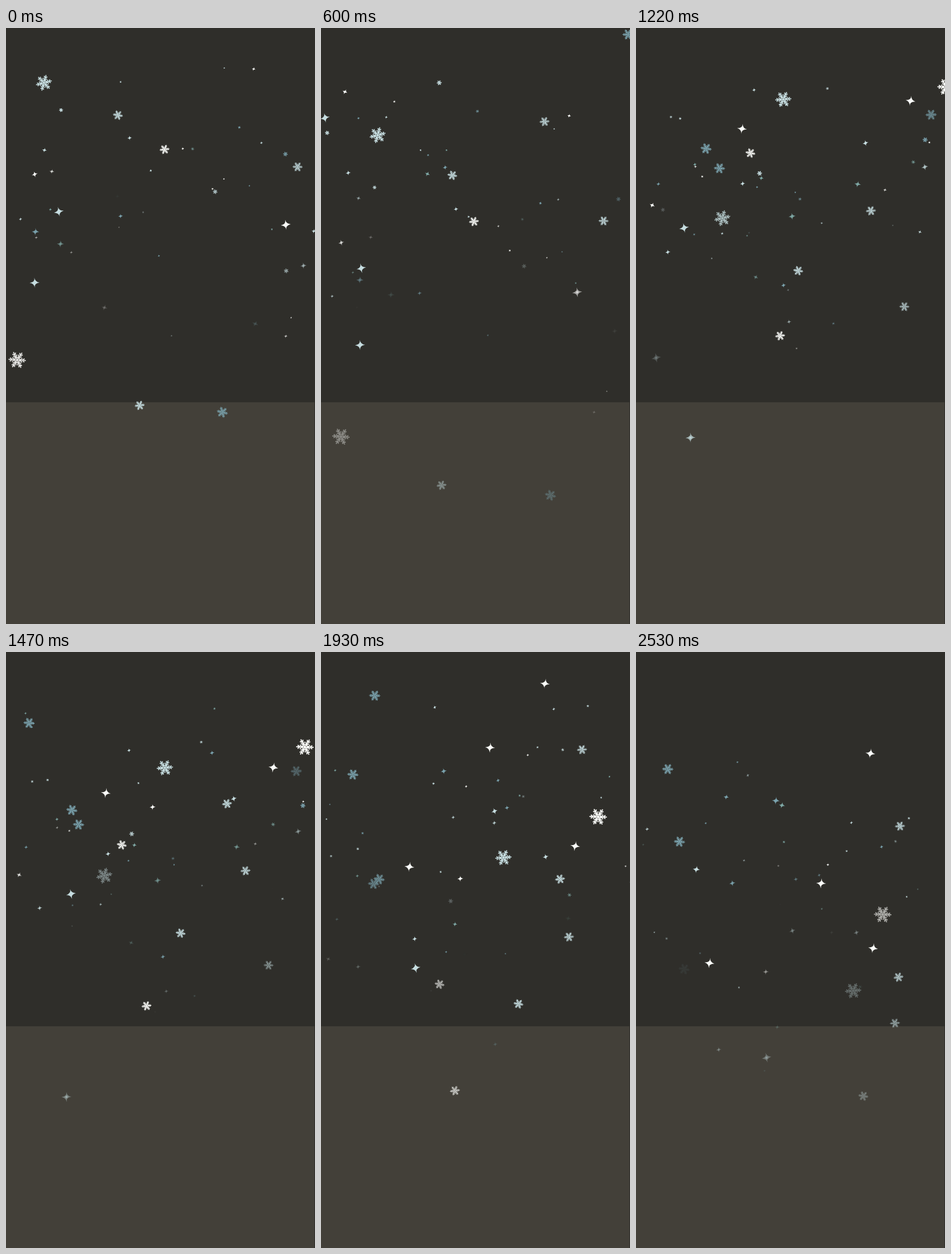
Animation of 497 by 957 pixels, one loop 2750 ms. Source, as an HTML page with a canvas:

```html
<!DOCTYPE html>
<html lang="en">
<head>
<meta charset="utf-8">
<title>Snowfall</title>
<style>
  html, body { margin: 0; width: 100%; height: 100%; overflow: hidden; background: #2f2e2a; }
  canvas { display: block; width: 497px; height: 957px; }
</style>
</head>
<body>
<canvas id="stage" width="497" height="957"></canvas>
<script>
const W = 497, H = 957, FLOOR = 601;
const LOOP = 2750, START = 210, HOLD = 230, LAST = 2530;
const ctx = document.getElementById('stage').getContext('2d');
const WHITE = '#fbfcf9', PALE = '#c6dde0', BLUE = '#7ba3ae', TEAL = '#7fa8a5';

// Rows: x, y, vx, vy, end, birth, acceleration (px, px/s, s)
const leads = [
  { draw: flake, tone: PALE, r: 13, rows: [
    [61, 88, 77, 215, 1.65], [175, -122, 50.5, 193, 2.6, 0, .21]] },
  { draw: flake, tone: WHITE, r: 14, rows: [
    [18, 533, 36, 315, .7], [565, -117, -60, 192, 2.8, 0, .09]] },
  { draw: flake, tone: PALE, r: 8, rows: [
    [180, 140, 80, 247, 2.65], [469, 223, -37, 222, 1.65], [348, 60, 29.5, 231, 2.8, .2],
    [276, -88, 63, 263, 3, 1.2], [215, 606, -54, 328, .8], [406, -196, 8, 205, 9, 1.7]] },
  { draw: flake, tone: WHITE, r: 8, rows: [
    [255, 195, -23, 296, 2.3], [177, -149, 5.5, 274, 2.25, 0, .26]] },
  { draw: flake, tone: BLUE, r: 9, rows: [
    [348, 617, 54, 341, .75], [506, -71, -31, 208, 1.65], [140, -50, -27, 241, 2.4, .85],
    [205, 16, -70, 207, 2.3, .5], [-2, -113, 31, 180, 9, 1.2], [188, -269, -59, 197, 9, 1.6]] },
  { draw: star, tone: WHITE, r: 8, rows: [
    [450, 316, -97, 277, .85], [211, -99, -40, 258, 9, .6], [198, -473, 43, 364],
    [312, -271, 28, 187], [488, -160, -46, 274, 9, .85]] },
  { draw: star, tone: PALE, r: 8, rows: [
    [-41, 26, 124, 309, 2.6, 0, -.055], [85, 295, -52, 232, 1.2], [46, 409, 44, 262, 1.6, 0, -.06]] }
];

let seed = 71;
function rnd(lo = 0, hi = 1) {
  seed = (seed * 16807) % 2147483647;
  return lo + (hi - lo) * seed / 2147483647;
}

const parts = [];
for (const { draw, tone, r, rows } of leads)
  for (const [x, y, vx, vy, end = 9, birth = 0, acc = 0] of rows)
    parts.push({ draw, tone, r, x, y, vx, vy, end, birth, acc, rot: rnd(-.25, .25) });

// Fine snow released steadily near the top
const COUNT = 112;
for (let i = 0; i < COUNT; i++) {
  const birth = -1.4 + 3.4 * i / COUNT;
  const vx = rnd(-75, 75), vy = rnd(180, 330);
  const draw = rnd() < .68 ? star : flake;
  const r = 1.6 + 5 * rnd() ** 2;
  parts.push({
    draw, vx, vy, birth, acc: 0,
    r: draw === flake ? r * .8 : r,
    tone: [WHITE, PALE, PALE, BLUE, TEAL][Math.floor(rnd(0, 5))],
    x: rnd(-10, W + 10) - vx * birth,
    y: rnd(45, 215) - vy * birth,
    end: birth + rnd(1, 1.75),
    rot: rnd(-.5, .5)
  });
}

function star(r) {
  const k = r * .13;
  ctx.beginPath();
  ctx.moveTo(0, -r);
  for (const [x, y] of [[1, 0], [0, 1], [-1, 0], [0, -1]]) {
    const px = y ? -y : x, py = x ? x : y;
    ctx.quadraticCurveTo((x || px) * k, (y || -py) * k, x * r, y * r);
  }
  ctx.closePath();
  ctx.fill();
  ctx.beginPath();
  ctx.arc(0, 0, r * .24, 0, 7);
  ctx.fill();
}

function flake(r) {
  ctx.lineWidth = Math.max(.8, r * .12);
  ctx.beginPath();
  for (let i = 0; i < 6; i++) {
    const a = i * Math.PI / 3;
    const at = (d, turn) => [d * r * Math.cos(a + turn), d * r * Math.sin(a + turn)];
    ctx.moveTo(0, 0);
    ctx.lineTo(...at(1, 0));
    if (r < 3) continue;
    for (const [root, tip, turn] of [[.58, .86, .24], [.3, .62, .38]]) {
      ctx.moveTo(...at(tip, -turn));
      ctx.lineTo(...at(root, 0));
      ctx.lineTo(...at(tip, turn));
    }
    ctx.moveTo(...at(.33, 0));
    ctx.lineTo(...at(.33, Math.PI / 3));
  }
  ctx.stroke();
}

function render(t) {
  const s = t < HOLD ? 0 : (Math.min(t, LAST) - START) / 1000;
  ctx.fillStyle = '#2f2e2a';
  ctx.fillRect(0, 0, W, H);
  ctx.fillStyle = '#434039';
  ctx.fillRect(0, FLOOR, W - 1, H - FLOOR);
  for (const p of parts) {
    if (s < p.birth || s >= p.end) continue;
    const d = s * (1 + p.acc * s);
    ctx.save();
    ctx.globalAlpha = Math.min(1, (p.end - s) / .8);
    ctx.translate(p.x + p.vx * d, p.y + p.vy * d);
    ctx.rotate(p.rot);
    ctx.fillStyle = ctx.strokeStyle = p.tone;
    p.draw(p.r);
    ctx.restore();
  }
}

const t0 = performance.now();
function tick() {
  render((performance.now() - t0) % LOOP);
  requestAnimationFrame(tick);
}
tick();
</script>
</body>
</html>
```
